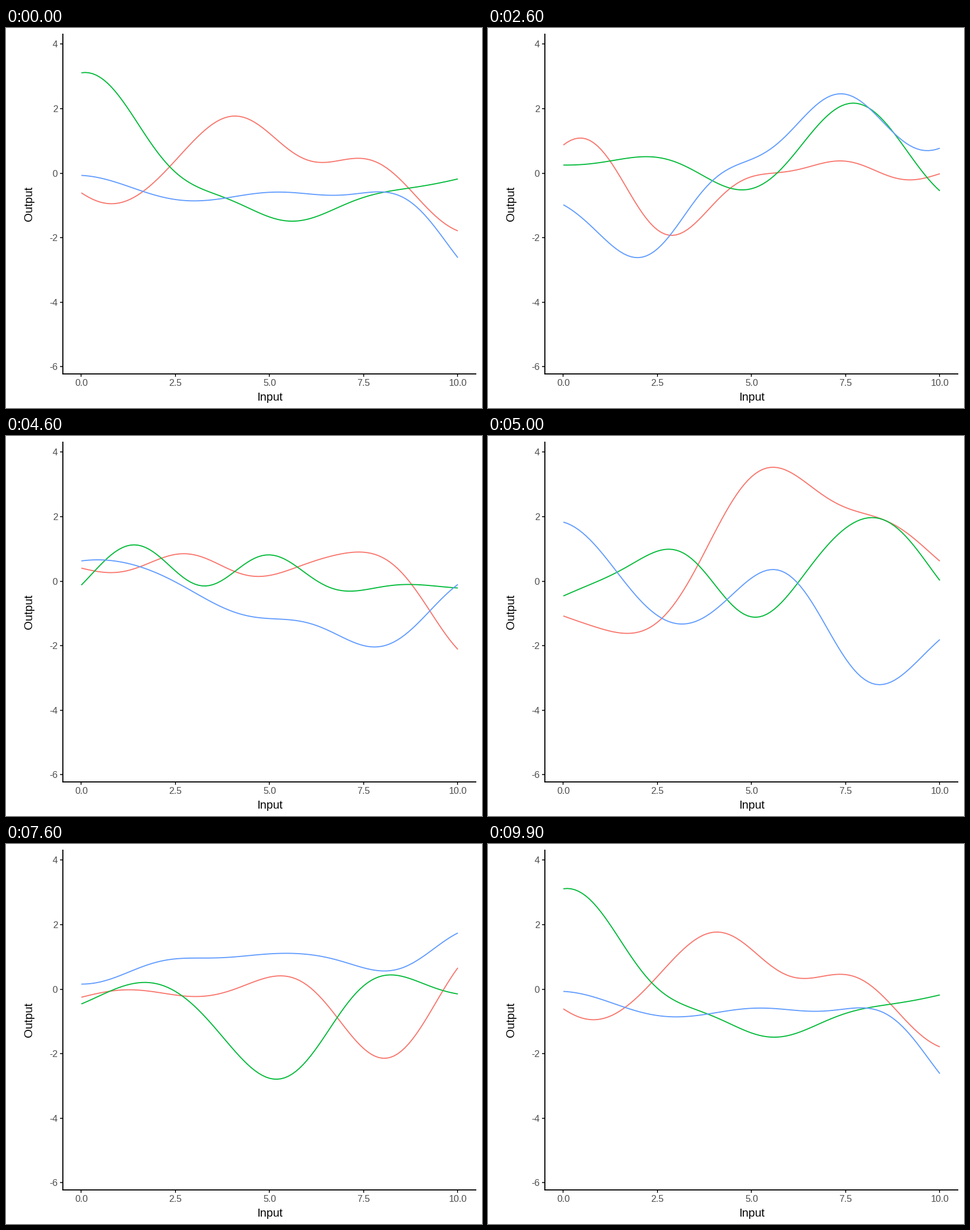
Recreate the animation shown at these times as a matplotlib script. Size 837 px wide and 669 px high, loop 10 s.

```python
import numpy as np
import matplotlib.pyplot as plt
from matplotlib.animation import FuncAnimation

W, H, DPI = 837, 669, 64
PT = 72 / DPI                      # points per pixel
COLORS = ("#F8766D", "#00BA38", "#619CFF")
LINE = 1.9 * PT
LEFT, RIGHT, TOP, BOTTOM = 100, 827.5, 9.5, 609
GRID = np.linspace(0, 10, 101)
SCALE = 1.6                        # length scale of the smooth curves

plt.rcParams["font.family"] = "Liberation Sans"
rng = np.random.default_rng(8)


def px(x):
    return 132.5 + 66.2 * x


def py(y):
    return 255.5 - 56.8 * y


# ---- smooth random functions ----
def covariance(a, b, flat):
    """Of values at a with values at b and with slopes at flat."""
    d, e = a[:, None] - b, a[:, None] - flat
    return np.hstack([np.exp(-d**2 / 2 / SCALE**2),
                      e / SCALE**2 * np.exp(-e**2 / 2 / SCALE**2)])


def smooth(points):
    """Gaussian-process mean through the points, level at every turning point."""
    x, y = np.array(points, float).T
    step = np.diff(y)
    flat = x[1:-1][step[:-1] * step[1:] < 0]
    d = flat[:, None] - x
    f = flat[:, None] - flat
    slope_rows = np.hstack([
        -d / SCALE**2 * np.exp(-d**2 / 2 / SCALE**2),
        (1 - f**2 / SCALE**2) / SCALE**2 * np.exp(-f**2 / 2 / SCALE**2)])
    gram = np.vstack([covariance(x, x, flat), slope_rows])
    gram += 1e-4 * np.eye(len(gram))
    goal = np.concatenate([y - y.mean(), np.zeros(len(flat))])
    return y.mean() + covariance(GRID, x, flat) @ np.linalg.solve(gram, goal)


def curve(start, *keys):
    """Curve from x = 0 to x = 10 by way of the key points between."""
    return smooth([(0, start), *keys[:-1], (10, keys[-1])])


def wander(x, y):
    """Random curve that passes through one given point."""
    free = [(k, rng.normal(0, 0.9)) for k in np.arange(0, 11, 2.5)
            if abs(k - x) > 1.4]
    return smooth(sorted(free + [(x, y)]))


def unmix(mix, end, t):
    """Start state whose blend with `end` at fraction t gives `mix`."""
    return (np.array(mix) - t * end) / (1 - t)


s0 = np.array([
    curve(-.61, (.8, -.95), (4.08, 1.77), (6.4, .33), (7.35, .46), -1.79),
    curve(3.11, (.1, 3.12), (2.37, .17), (4, -.85), (5.6, -1.49), (8, -.6), -.18),
    curve(-.07, (3, -.86), (6, -.64), (7.9, -.58), (9, -1.15), -2.62)])
s1 = np.array([wander(6, -3.4), wander(3, 1.5), wander(8, 2)])

s4 = np.array([wander(10, -2.8), wander(3.2, -.4), wander(7.4, -1.9)])
s3 = unmix([
    curve(-1.27, (1.97, .37), (3.5, 1), (5.3, 1.18), (7, 1.03), (8.3, 0), -3.62),
    curve(.83, (1, 1.14), (3.2, 2.89), (5.6, 1.17), (7.77, 2.34), 1.36),
    curve(-.93, (2, .36), (3.55, -.13), (5.4, .55), (8.25, -.77), -.16)], s4, 0.2)
s2 = unmix([
    curve(.87, (.45, 1.09), (2.88, -1.93), (5, -.11), (7.35, .38), (9.2, -.21), -.02),
    curve(.25, (2.2, .51), (4.75, -.52), (7.7, 2.17), -.55),
    curve(-.98, (1.97, -2.62), (4, -.19), (5, .43), (7.37, 2.46), (9.67, .69), .78)],
    s3, 0.2)

s5 = np.array([
    curve(-1.08, (1.7, -1.62), (5.57, 3.53), (7.5, 2.28), (8.4, 1.95), .62),
    curve(-.46, (1, .04), (2.8, .99), (5.1, -1.12), (8.2, 1.97), .02),
    curve(1.83, (3.15, -1.33), (5.57, .36), (8.4, -3.21), -1.81)])

s7 = np.array([wander(8, -3.9), wander(8, -1.1), wander(3, 1.9)])
s6 = unmix([
    curve(-1.93, (1, -.29), (2.5, .35), (3.8, .55), (6.5, -2.23), (8.2, -1.3), -2.4),
    curve(.48, (.9, .22), (3.45, 1.28), (5.5, -.35), (7.9, -2.61), -.55),
    curve(-1.03, (3.05, 2.42), (5, .98), (7.6, -1.69), .03)], s7, 0.2)

s9 = np.array([wander(2, -3.5), wander(5, .8), wander(1.7, 3.8)])
s8 = unmix([
    curve(.28, (2.3, -1.38), (5.45, .46), (7.95, -.54), .37),
    curve(1.21, (3, -2.12), (4.95, -3.13), (7.1, -.25), (8.75, 1.43), 1.11),
    curve(.3, (1.6, 1.38), (4, .09), (7.1, 1.8), (8.75, 1.28), 1.71)], s9, 0.4)

STATES = [s0, s1, s2, s3, s4, s5, s6, s7, s8, s9]
ARRIVALS = [*range(10, 51, 10), *range(59, 100, 10)]
STEPS = 5


def pose(k):
    """Hold each state, then move linearly to the next one."""
    i = next(n for n, end in enumerate(ARRIVALS) if k <= end)
    t = max(0, (k - ARRIVALS[i] + STEPS) / STEPS)
    return (1 - t) * STATES[i] + t * STATES[(i + 1) % len(STATES)]


# ---- stage ----
fig = plt.figure(figsize=(W / DPI, H / DPI), dpi=DPI, facecolor="white")
ax = fig.add_axes([0, 0, 1, 1])
ax.set_xlim(0, W)
ax.set_ylim(H, 0)
ax.axis("off")


def stroke(xs, ys, color):
    return ax.plot(xs, ys, color=color, lw=LINE, solid_capstyle="butt",
                   solid_joinstyle="round")[0]


def label(x, y, text, size, color, **kw):
    ax.text(x, y, text, fontsize=size * PT, color=color, va="baseline", **kw)


lines = [stroke(px(GRID), py(row), c) for row, c in zip(s0, COLORS)]

for v in range(-6, 5, 2):
    stroke([LEFT - 5, LEFT], [py(v)] * 2, "#333333")
    label(91, py(v) + 6.2, str(v), 16.5, "#4D4D4D", ha="right")
for v in np.arange(0, 11, 2.5):
    stroke([px(v)] * 2, [BOTTOM, BOTTOM + 5], "#333333")
    label(px(v), 630, f"{v:.1f}", 16.5, "#4D4D4D", ha="center")

stroke([LEFT, LEFT], [TOP, BOTTOM + 1], "black")
stroke([LEFT - 1, RIGHT], [BOTTOM, BOTTOM], "black")
label(463.5, 656, "Input", 20.4, "black", ha="center")
label(46.3, 309.5, "Output", 20.4, "black", ha="center", rotation=90,
      rotation_mode="anchor")


def update(k):
    for line, row in zip(lines, pose(k)):
        line.set_ydata(py(row))
    return lines


anim = FuncAnimation(fig, update, frames=100, interval=100, repeat=True,
                     repeat_delay=0)
plt.show()
```
